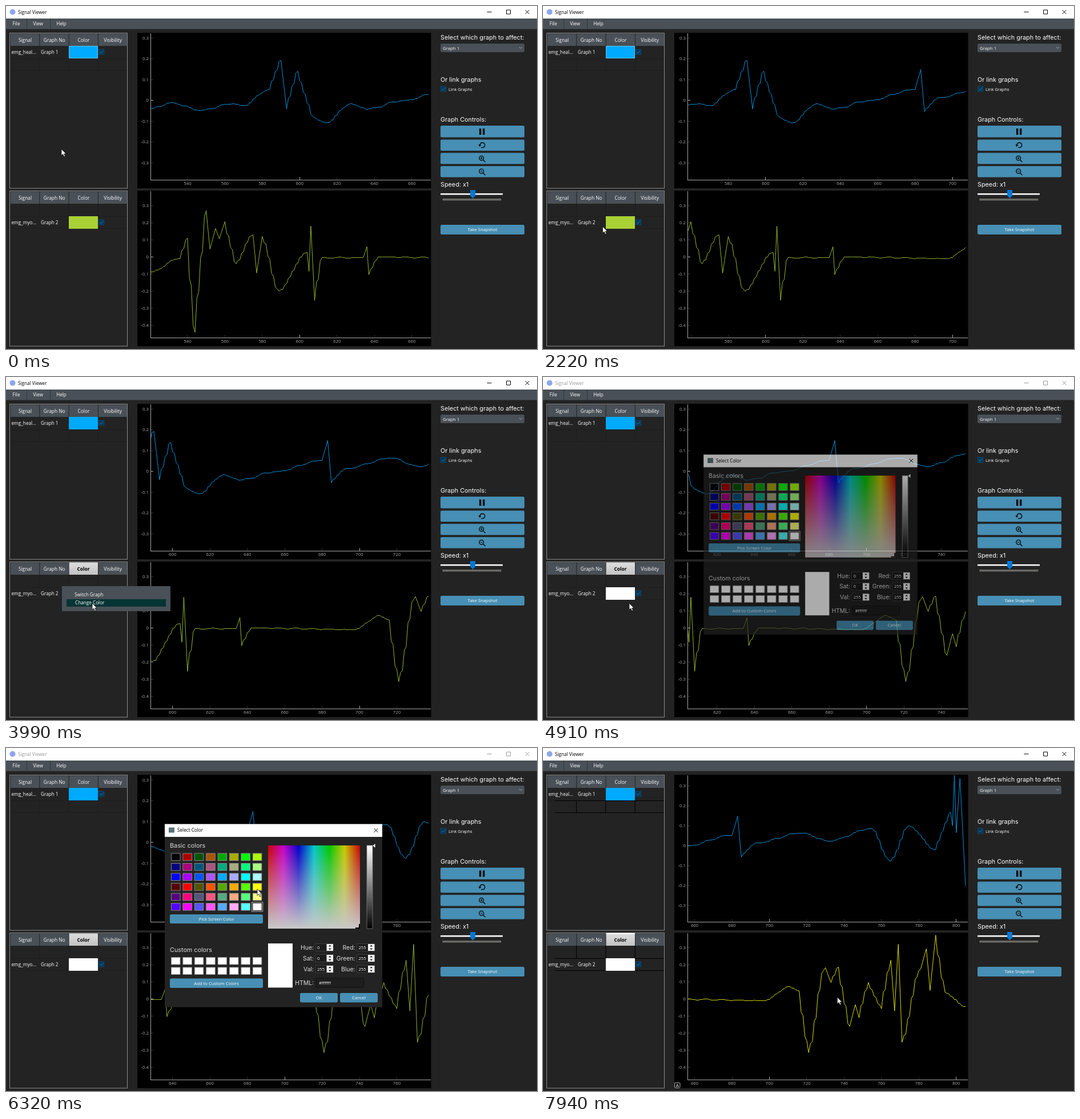
Write an HTML page that moves like this. It is 930 by 602 pixels and loops after 8 s.

```html
<!DOCTYPE html>
<html lang="en">
<head>
<meta charset="utf-8">
<title>Signal Viewer</title>
<style>
html, body { margin: 0; width: 100%; height: 100%; overflow: hidden; background: #232323; }
svg { display: block; width: 100%; height: 100%; font-family: "Open Sans", "Noto Sans", sans-serif; }
.head { font-family: Inter, sans-serif; }
.crisp { shape-rendering: crispEdges; }
</style>
</head>
<body>
<svg id="stage" viewBox="0 0 930 602"></svg>
<script>
const DURATION = 8000, STEP = 58.4, STEPS = 136, PX = 3.2727;
const BAR = '#495057', BTN = '#478fb4', BG = '#232323', AXIS = '#a8a8a8';

const clamp = v => Math.max(0, Math.min(1, v));
const smooth = p => p * p * (3 - 2 * p);
const range = (n, f) => Array.from({ length: n }, (_, i) => f(i)).join('');

// Markup helpers
const rect = (x, y, w, h, fill, more = '') =>
  `<rect x="${x}" y="${y}" width="${w}" height="${h}" fill="${fill}" ${more}/>`;
const path = (d, stroke, more = '') => `<path d="${d}" fill="none" stroke="${stroke}" ${more}/>`;
const text = (x, y, s, { size = 8.2, fill = '#fff', anchor = 'start', more = '' } = {}) =>
  `<text x="${x}" y="${y + size * 0.36}" font-size="${size}" fill="${fill}" text-anchor="${anchor}" ${more}>${s}</text>`;
const mid = (x, y, s, opt = {}) => text(x, y, s, { anchor: 'middle', ...opt });
const heading = (x, y, s, opt = {}) => text(x, y, s, { size: 10.8, more: 'class="head"', ...opt });
const button = (x, y, w, h, label = '') =>
  rect(x, y, w, h, BTN, 'rx="2.5"') + mid(x + w / 2, y + h / 2, label, { size: 7.7 });

// Turning points of each signal: sample, thousandths
const healthy = [
  [520, -41], [532, -12], [547, -48], [565, -16], [570, -26], [584, 52], [590, 193], [593, -40], [599, 141],
  [607, -78], [614, -110], [628, -16], [636, -43], [655, -3], [680, 52], [683, 147], [685, -56], [692, 12],
  [718, 64], [732, 23], [755, 86], [765, -77], [775, 100], [789, -20], [797, 167], [798, 100], [799, 353],
  [800, 67], [802, 338], [805, -203]];
const myopathy = [
  [520, -92], [536, -10], [540, 110], [544, -443], [550, 270], [552, 45], [555, 168], [557, 105], [560, 207],
  [566, -40], [575, 130], [577, -93], [580, 120], [589, -200], [604, 25], [605, -83], [606, 180], [608, -255],
  [612, -5], [634, -5], [636, 58], [637, -105], [642, 0], [698, -10], [711, 73], [716, 45], [721, -315],
  [730, 183], [733, 95], [737, 185], [743, -160], [746, -33], [748, -110], [753, 95], [760, -57], [765, 225],
  [767, -70], [769, 320], [771, -255], [781, 175], [784, 295], [786, 50], [789, 375], [794, 40], [805, -45]];

// Joins turning points in two-sample stairs, with a faint ripple on long stretches
function sampled(points) {
  const out = [];
  points.slice(1).forEach(([b, yb], i) => {
    const [a, ya] = points[i], long = b - a > 8;
    const at = x => {
      const p = clamp((x - a) / (b - a));
      return ya + (yb - ya) * (long ? smooth(p) : p) + (long ? 4 * Math.sin(x * 0.7) * Math.sin(p * Math.PI) : 0);
    };
    for (let x = a; x <= b; x++)
      out[x] = ((x - a) % 2 && b - a > 3 ? at(x - 1) * 0.15 + at(x + 1) * 0.85 : at(x)) / 1000;
    out[b] = yb / 1000;
  });
  return out;
}
const blue = sampled(healthy), green = sampled(myopathy);

function plot(n, data, color, top, zero, unit, lowest) {
  const xOf = v => 514.3 + (v - 600 - n) * PX, yOf = v => zero - v * unit;
  const base = top + 257, first = 520 + n;
  let marks = path(`M253.5 ${top}V${base}`, AXIS) + path(`M253 ${base + 0.5}H744`, AXIS), labels = '', pts = '';
  for (let v = Math.ceil(first / 20) * 20; v < first + 152; v += 20) {
    const x = xOf(v);
    if (x < 254 || x > 744) continue;
    marks += path(`M${Math.floor(x) + 0.5} ${base - 5}V${base}`, v % 100 ? '#2c2c2c' : AXIS);
    if (x > 260 && x < 737) labels += mid(x, base + 6, v, { size: 7.8, fill: AXIS });
  }
  for (let k = lowest; k <= 3; k++) {
    const y = yOf(k / 10);
    marks += path(`M254 ${Math.floor(y) + 0.5}h4`, k ? '#2c2c2c' : AXIS);
    labels += text(250, y, k ? (k / 10).toFixed(1) : 0, { size: 7.8, fill: AXIS, anchor: 'end' });
  }
  for (let v = first; v < first + 150; v++) pts += `${xOf(v).toFixed(1)},${Math.floor(yOf(data[v])) + 0.5} `;
  return `<g class="crisp">${marks}</g>
    <polyline points="${pts}" fill="none" stroke="${color}" stroke-width="0.85" clip-path="url(#clip${top})"/>${labels}`;
}

const check = (x, y) => rect(x + 0.5, y + 0.5, 9, 9, '#0a3350', 'stroke="#0a4a75"') +
  path(`M${x + 2.5} ${y + 5}l2 2l3.5-4`, '#0e639c', 'stroke-width="1.2"');

// Row and column lines of the two empty rows
const gridLines = (x, color) => path(
  `M${x} 92.5H212M${x} 113.5H212M${x} 369.5H109M161 369.5H212M${x} 390.5H109M161 390.5H212` +
  range(3, i => `M${58.5 + i * 51.3} 92v21m0 234v22`), color);

function table(top, row, name, graph) {
  const cols = ['Signal', 'Graph No', 'Color', 'Visibility'];
  return rect(6.5, top - 0.5, 206, 272.5, BG, 'stroke="#8c8c8c"') +
    cols.map((c, i) => rect(8 + i * 51.3, top + 0.5, 50.3, 21.5, BAR) + mid(33.5 + i * 51.2, top + 11.5, c, { size: 8.4 })).join('') +
    text(9.5, row + 11, name) + text(61, row + 11, graph) + check(162, row + 5.5);
}

const lens = (y, sign) => `<circle cx="832.7" cy="${y - 1}" r="3.9" fill="none" stroke="#000" stroke-width="1.3"/>` +
  path(`M835.5 ${y + 2}l4 4M830.7 ${y - 1}h4${sign ? `M832.7 ${y - 3}v4` : ''}`, '#000', 'stroke-width="1.2"');

const sidebar = () =>
  heading(761, 55, 'Select which graph to affect:') + rect(761, 66, 147, 15, BAR, 'rx="2.5"') +
  text(765, 74, 'Graph 1', { size: 7.8 }) + path('M899 72l2.5 2.5l2.5-2.5', '#aaa') +
  heading(761, 129, 'Or link graphs') + check(761, 140.5) + text(775, 146, 'Link Graphs', { size: 7.5 }) +
  heading(761, 199, 'Graph Controls:') +
  button(761, 210, 147, 20.5) + range(3, i => button(761, 234.5 + i * 23.3, 147, 19.5)) +
  rect(829, 215, 3.3, 11, '#000') + rect(835, 215, 3.3, 11, '#000') +
  path('M829.9 244.5A4.4 4.4 0 1 1 832.2 248', '#000', 'stroke-width="1.4"') +
  '<path d="M827.2 243.5h5.2l-2.6 3.4z"/>' + lens(268, true) + lens(291, false) +
  heading(761, 313, 'Speed: x1') + rect(761, 328.8, 109, 2.6, '#fff') +
  '<path d="M813 323h9v10l-4.5 4.5l-4.5-4.5z" fill="#0078d7"/>' +
  path('M765 339.7H867.5', '#b8b8b0', 'stroke-width="3.4" stroke-dasharray="1 1.1"') +
  button(761, 384, 147, 17, 'Take Snapshot');

const well = (x, y, fill) => rect(x - 7.5, y - 6, 15.5, 12.5, fill, 'stroke="#8f8f8f" stroke-width="0.9"');
const spin = (x, y, v) => rect(x, y - 6.5, 31, 13, '#1c1c1c', 'stroke="#444" stroke-width="0.8"') +
  text(x + 3, y, v, { size: 7.6 }) + rect(x + 19.5, y - 6, 11.5, 12, '#f0f0f0') +
  `<path d="M${x + 23} ${y - 1.7}l2.2-2.6l2.2 2.6zM${x + 23} ${y + 1.7}l2.2 2.6l2.2-2.6z"/>`;
const fields = (x, rows) => rows.map(([label, v], i) =>
  heading(x - 3, 350 + i * 19, label, { size: 10.4, anchor: 'end', fill: '#ddd' }) + spin(x, 350 + i * 19, v)).join('');

function dialog(picked) {
  const color = picked ? '#ffff00' : '#ffffff', cx = i => 297 + i * 20.4;
  const shade = i => {
    const r = Math.floor(i / 3) % 4 * 85, g = Math.floor(i / 12) * 85, b = Math.floor(i % 3 * 127.5);
    return well(cx(Math.floor(i / 6)), 191 + i % 6 * 17.5, `rgb(${r},${g},${b})`);
  };
  return rect(278, 133, 381, 322, BG) + rect(278, 133.5, 381, 22.5, '#fff') +
    rect(285, 139.5, 10, 9, '#5d7377') + text(300, 144.5, 'Select Color', { fill: '#000' }) +
    path('M644.5 141l7 7m0-7l-7 7', '#000') +
    heading(287, 171.5, 'Basic colors', { fill: '#ddd' }) + range(48, shade) +
    rect(cx(7) - 9.5, picked ? 235.5 : 270.5, 19.5, 16.5, 'none', 'stroke="#ccc" stroke-width="0.8"') +
    button(287, 292, 163, 16, 'Pick Screen Color') +
    heading(287, 354, 'Custom colors', { fill: '#ddd' }) +
    range(16, i => well(cx(i % 8), 373.5 + (i > 7 ? 17.5 : 0), '#fff')) +
    button(287, 404.5, 163, 16.5, 'Add to Custom Colors') +
    rect(459, 171, 161, 146, 'url(#hue)') + rect(459, 171, 161, 146, 'url(#sat)') +
    path(picked ? 'M584 171h18M593 171v10' : 'M612 316h8M619 309v8', '#000', 'stroke-width="2"') +
    rect(632, 171, 10, 146, color) + rect(632, 171, 10, 146, 'url(#val)', 'stroke="#888" stroke-width="0.7"') +
    '<path d="M642.5 171.5l4-3.5v7z" fill="#fff"/>' + rect(459, 343, 43, 77.5, color) +
    fields(542, [['Hue:', picked ? 60 : 0], ['Sat:', picked ? 255 : 0], ['Val:', 255]]) +
    fields(614.5, [['Red:', 255], ['Green:', 255], ['Blue:', picked ? 0 : 255]]) +
    heading(539, 412, 'HTML:', { size: 10.4, anchor: 'end', fill: '#ddd' }) +
    rect(543, 404, 83.5, 16, '#1e1e1e', 'stroke="#111" rx="1.5"') + text(548, 412.5, color, { size: 7.8 }) +
    button(515, 430, 66, 16.5, 'OK') + button(585, 430, 66, 16.5, 'Cancel');
}

const menu = hover => rect(98, 367, 190, 44, BAR) + text(120, 382.5, 'Switch Graph') +
  (hover ? rect(106, 390, 174, 13, '#063434') : '') + text(hover ? 121 : 120, 396.5, 'Change Color');

const stop = (o, c, a = 1) => `<stop offset="${o}" stop-color="${c}" stop-opacity="${a}"/>`;
const fall = (id, top, bottom) => `<linearGradient id="${id}" x2="0" y2="1">${top + bottom}</linearGradient>`;
const clip = top => `<clipPath id="clip${top}">${rect(254, top, 490, 257, '#000')}</clipPath>`;
const stage = document.getElementById('stage');
stage.innerHTML = `<defs>${clip(48) + clip(325)}
  <linearGradient id="hue">${range(7, i => stop(i / 6, `hsl(${360 - i * 60} 100% 39.2%)`))}</linearGradient>
  ${fall('sat', stop(0, '#c8c8c8', 0), stop(1, '#c8c8c8')) + fall('val', stop(0, '#000', 0), stop(1, '#000')) +
    fall('lit', stop(0, '#dedede'), stop(1, '#c2c2c2'))}</defs>` +
  rect(0, 0, 930, 602, BG) + rect(0, 0, 930, 22, '#fff') + '<circle cx="11.5" cy="10.5" r="5" fill="#8ea6ee"/>' +
  '<g id="bar"></g>' + rect(0, 22, 930, 18.5, BAR) + path('M36.5 22v18M77.5 22v18', '#263a3d') +
  mid(18, 31.5, 'File') + mid(56, 31.5, 'View') + mid(97, 31.5, 'Help') +
  table(48, 70, 'emg_heal...', 'Graph 1') + table(325, 369, 'emg_myo...', 'Graph 2') + gridLines(8, '#1e1e1e') +
  '<g id="cells"></g>' + rect(230, 47, 514.5, 273, '#000') + rect(230, 324, 514.5, 273, '#000') +
  '<g id="plots"></g>' + sidebar() + '<g id="menu"></g><g id="dialog"></g>' +
  '<g id="cursor"><path d="M0 0V11.5L2.7 9.1L4.7 13.5L6.6 12.6L4.7 8.4H8.2Z" fill="#fff" stroke="#000" stroke-width="0.7"/></g>';
const part = id => document.getElementById(id);

// Moments of the interaction
const LEAVE = 450, ENTER = 1850, SELECT = 2800, MENU = 3000, HOVER = 3550, OPEN = 4800, PICK = 6500, CLOSE = 7620;

// Pointer moves: start, end, target
const moves = [[ENTER, 2200, 104.5, 387], [MENU, 3700, 151, 397], [5150, 5760, 440, 247.5],
  [6680, 7250, 548, 436], [CLOSE, 7880, 515.5, 437.5]];
const cursorAt = t => moves.reduce(([x, y], [a, b, u, v]) => {
  const e = smooth(clamp((t - a) / (b - a)));
  return [x + (u - x) * e, y + (v - y) * e];
}, t < ENTER ? [97, 251] : [16, 310]);

function cells(t) {
  const on = t >= SELECT;
  return rect(110, 70, 51, 22, '#00aaff') + rect(110, 369, 51, 22, on ? '#fff' : '#a9d136') +
    (on ? rect(110.6, 325.5, 50.4, 21.5, 'url(#lit)') +
      mid(135.5, 336.5, 'Color', { size: 8.4, fill: '#000', more: 'font-weight="700"' })
      : rect(110.5, 70.5, 50, 21, 'none', 'stroke="#5cc6ff"')) +
    (t >= CLOSE ? rect(110.6, 324.5, 50.4, 2, '#fff') + gridLines(21, '#000') : '');
}

let last = -1;
function draw(time) {
  const n = Math.max(0, Math.min(STEPS, Math.floor((time - 55) / STEP) + 1));
  if (n === last) return;
  last = n;
  const t = n ? 60 + (n - 1) * STEP : 0;
  const ink = t >= OPEN && t < CLOSE ? '#999' : '#000';
  part('bar').innerHTML = text(21, 11, 'Signal Viewer', { fill: ink }) +
    path('M842.5 10.5h8M876.5 7h7v7h-7zM909.5 7l7 7m0-7l-7 7', ink);
  part('cells').innerHTML = cells(t);
  const [zero, unit] = blue[669 + n] > 0.32 || t >= CLOSE ? [171.5, 350.5] : [165.5, 365];
  part('plots').innerHTML = plot(n, blue, '#00aaff', 48, zero, unit, -3) +
    plot(n, green, t < CLOSE ? '#aad436' : '#ffff00', 325, 440.3, 299.3, -4) +
    (t >= CLOSE + 120 ? rect(230.5, 587.5, 9.5, 9, '#111', 'rx="1.5" stroke="#aaa"') + mid(235.3, 592, 'A', { size: 8 }) : '');
  part('menu').innerHTML = t >= MENU && t < OPEN ? menu(t >= HOVER) : '';
  const p = t < CLOSE ? clamp((t - OPEN) / 160) : 1 - clamp((t - CLOSE) / 120), k = 0.948 + 0.052 * p;
  const box = part('dialog');
  box.innerHTML = p > 0 ? dialog(t >= PICK) : '';
  box.setAttribute('opacity', p);
  box.setAttribute('transform', `translate(468.5 294) scale(${k}) translate(-468.5 -294)`);
  const [x, y] = cursorAt(t), tip = part('cursor');
  tip.setAttribute('transform', `translate(${x.toFixed(1)} ${y.toFixed(1)})`);
  tip.setAttribute('visibility', t > LEAVE && t < ENTER ? 'hidden' : 'visible');
}

const start = performance.now();
function loop() {
  draw((performance.now() - start) % DURATION);
  requestAnimationFrame(loop);
}
loop();
</script>
</body>
</html>
```
